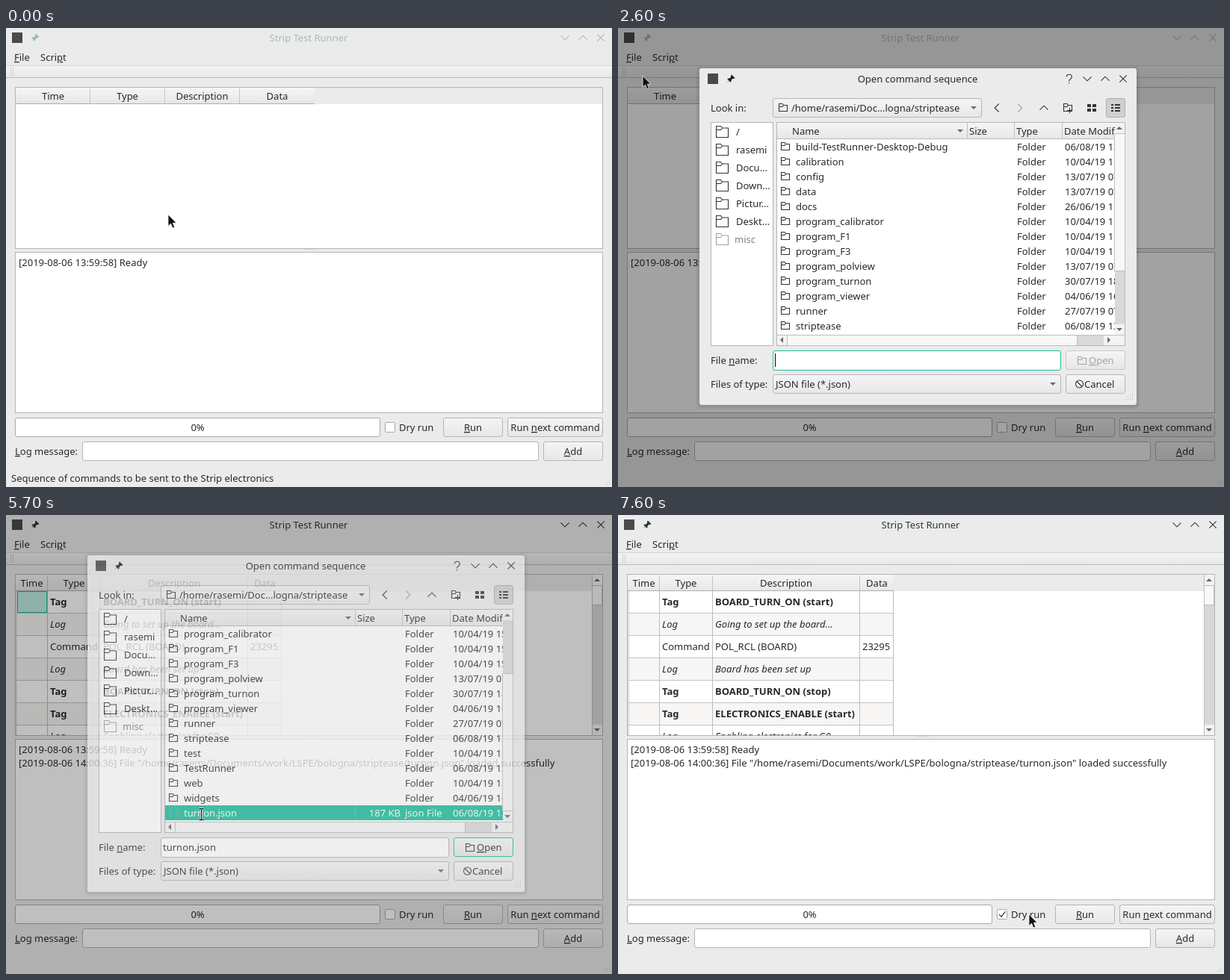
An HTML page that plays this animation: 811 px wide and 615 px high, repeating every 8 s.

```html
<!DOCTYPE html>
<html lang="en">
<head>
<meta charset="utf-8">
<title>Strip Test Runner</title>
<style>
html, body { margin: 0; width: 100%; height: 100%; overflow: hidden; background: #ebebeb; }
svg { display: block; width: 811px; height: 615px; }
text { font: 13px 'Noto Sans', 'Open Sans', sans-serif; fill: #26292c; }
.b { font-weight: 700; }
.i { font-style: italic; }
.u { text-decoration: underline; text-decoration-skip-ink: none; }
.w { fill: #fff; }
.off { fill: #a2a4a5; }
.ln { fill: none; stroke: #30353a; stroke-width: 1.1; }
</style>
</head>
<body>
<svg id="stage" viewBox="0 0 811 615"></svg>
<script>
const TEAL = '#1abc9c', EDGE = '#b4b5b6', INK = '#30353a', PALE = '#a6bac3', BG = '#ebebeb';
const LOOP = 8000, TICK = 100;

// ---- drawing helpers -------------------------------------------------
const box = (x, y, w, h, fill, stroke, r = 0) => stroke
  ? `<rect x="${x + .5}" y="${y + .5}" width="${w - 1}" height="${h - 1}" rx="${r}" fill="${fill}" stroke="${stroke}"/>`
  : `<rect x="${x}" y="${y}" width="${w}" height="${h}" rx="${r}" fill="${fill}"/>`;

const path = (d, stroke = INK, extra = '') => `<path class="ln" d="${d}" style="stroke:${stroke}" ${extra}/>`;

// "&" marks the underlined letter
const text = (x, y, s, cls = '', anchor = 'start') => {
  const body = s.replace(/&(.)/, '<tspan class="u">$1</tspan>');
  return `<text x="${x}" y="${y}" class="${cls}" text-anchor="${anchor}">${body}</text>`;
};
const mid = (x, y, s, cls = '') => text(x, y, s, cls, 'middle');

const group = (id, body, extra = '') => `<g id="${id}" ${extra}>${body}</g>`;
const at = (x, y, body) => `<g transform="translate(${x} ${y})">${body}</g>`;

const chevron = (x, y, dx, dy, color) => dy
  ? path(`M${x - 5.5} ${y - 2.7 * dy}L${x} ${y + 2.8 * dy}L${x + 5.5} ${y - 2.7 * dy}`, color)
  : path(`M${x - 2.7 * dx} ${y - 5.5}L${x + 2.8 * dx} ${y}L${x - 2.7 * dx} ${y + 5.5}`, color);
const cross = (x, y, color) =>
  path(`M${x - 4.7} ${y - 4.7}l9.4 9.4M${x + 4.7} ${y - 4.7}l-9.4 9.4`, color);
const tri = (x, y, dx, dy, s = 4) => dy
  ? `<path d="M${x - s} ${y - s / 2 * dy}h${2 * s}l${-s} ${s * dy}z" fill="#65696c"/>`
  : `<path d="M${x - s / 2 * dx} ${y - s}v${2 * s}l${s * dx} ${-s}z" fill="#65696c"/>`;
const pin = (x, y, color) => at(x, y,
  `<path d="M1-5.5L5.5-1L4 0L2.6-.2L.6 1.8L.4 4L-.8 4.4L-2.4 2.6L-5.4 5.4L-2.8 2.2L-4.6.6L-4-.4L-1.8-.6L.2-2.6L0-4.2z" fill="${color}"/>`);
const button = (x, y, w, h = 26, edge = EDGE) => box(x, y, w, h, 'url(#btn)', edge, 2.5);
const folder = (x, y, color = INK) =>
  path(`M${x + .5} ${y + 10.5}v-10h4.5l1.5 2h5v8zM${x + .5} ${y + 4.5}h4.5l1.5-2`, color);
const bigFolder = (x, y, color = INK) =>
  path(`M${x + .5} ${y + 15.5}v-15h6l2 2.5h8v12.5zM${x + .5} ${y + 5.5}h6l2-2.5`, color);
const mark = (x, y) => box(x, y, 14, 14, '#4a4a4a');

const dots = (x, y, cols, rows, sx, sy) => {
  let s = '';
  for (let c = 0; c < cols; c++) for (let r = 0; r < rows; r++) s += box(x + c * sx, y + r * sy, 1, 1, '#b2b2b2');
  return s;
};

// ---- main window -----------------------------------------------------
const titleBar = (id, color, pinColor) => group(id,
  mid(405, 18, 'Strip Test Runner').replace('class=""', `style="fill:${color}"`) +
  chevron(748, 13, 0, 1, color) + chevron(772, 13, 0, -1, color) + cross(796, 13, color) +
  pin(39, 13, pinColor));

const header = (edges, labels) => {
  const last = edges[edges.length - 1];
  let s = box(edges[0], 80, last - edges[0], 21, 'url(#btn)') + box(edges[0], 101, last - edges[0], 1, '#aeafb0');
  labels.forEach((l, i) => {
    s += mid((edges[i] + edges[i + 1]) / 2 + .5, 96, l);
    if (i) s += box(edges[i], 81, 1, 20, '#c3c4c4');
  });
  return s;
};
const COLS = ['Time', 'Type', 'Description', 'Data'];

const ROWS = [
  ['Tag', 'BOARD_TURN_ON (start)'], ['Log', 'Going to set up the board...'],
  ['Command', 'POL_RCL (BOARD)', '23295'], ['Log', 'Board has been set up'],
  ['Tag', 'BOARD_TURN_ON (stop)'], ['Tag', 'ELECTRONICS_ENABLE (start)'],
  ['Log', 'Enabling electronics for G0...']
];

function loadedTable() {
  let s = header([13, 55, 126, 323, 369], COLS);
  ROWS.forEach(([type, desc, data = ''], i) => {
    const y = 102 + i * 30, cls = { Tag: 'b', Log: 'i' }[type] || '';
    if (i % 2) s += box(14, y, 355, 29, '#f7f6f5');
    s += box(14, y + 29, 355, 1, '#c2c3c3');
    s += text(59, y + 19, type, cls) + text(130, y + 19, desc, cls) + text(327, y + 19, data);
  });
  [13.5, 55, 126, 323, 368].forEach(x => s += box(x, 102, 1, 194, '#bcbdbd'));
  s += group('cell', box(15, 102, 40, 29, 'rgba(26,188,156,.28)', TEAL));
  s += box(784, 80, 14, 215, '#d8d8d8') + box(784, 80, 14, 15, '#f2f2f2') + box(784, 281, 14, 14, '#f2f2f2');
  s += box(784, 80, 1, 215, '#c0c0c0') + box(784, 94, 14, 27, '#f8f8f8', '#bebebe');
  return s + tri(791, 87, 0, -1) + tri(791, 288, 0, 1);
}

function mainWindow() {
  let s = box(0, 0, 811, 615, BG) + mark(8, 6);
  s += titleBar('idle', PALE, '#9db6c2') + titleBar('active', INK, INK);
  s += group('fileOn', box(7, 28, 29, 23, TEAL, '#17a98c') + text(11, 44, '&File', 'w'));
  s += group('fileOff', text(11, 44, '&File')) + text(46, 44, 'Scri&pt');
  s += box(0, 50, 811, 17, 'url(#btn)') + box(0, 50, 811, 1, '#d5d5d5') + box(0, 66, 811, 1, '#bcbcbc');
  s += dots(6, 53, 2, 6, 3, 2);
  s += box(12, 79, 787, 217, '#fff', EDGE) + box(13, 80, 785, 22, BG);
  s += group('empty', header([13, 112, 212, 312, 413], COLS));
  s += group('loaded', loadedTable(), 'clip-path="url(#tableClip)"');
  s += dots(399, 296, 6, 1, 3, 2);
  s += box(12, 300, 787, 216, '#fff', EDGE) + text(17, 319, '[2019-08-06 13:59:58] Ready');
  s += group('log2', text(17, 337,
    '[2019-08-06 14:00:36] File "/home/rasemi/Documents/work/LSPE/bologna/striptease/turnon.json" loaded successfully'));
  s += box(12, 522, 489, 26, '#fff', '#a9aaab', 2.5) + mid(256.5, 540, '0%');
  s += box(507, 528, 14, 14, '#fff', '#a9aaab', 1);
  s += group('check', path('M510 535l3 3.4l5.2-7', '#1b1d1f', 'stroke-width="2"'));
  s += text(526, 540, 'Dry run');
  s += button(585, 522, 80) + mid(625, 540, '&Run') + button(671, 522, 128) + mid(735, 540, 'Run &next command');
  s += text(12, 572, '&Log message:') + box(102, 554, 611, 26, '#fff', EDGE, 2.5);
  s += button(719, 554, 80) + mid(759, 572, '&Add');
  s += group('status', text(7, 608, 'Sequence of commands to be sent to the Strip electronics'));
  return s + dots(801, 611, 3, 1, 3, 3) + dots(804, 608, 2, 1, 3, 3) + dots(807, 605, 1, 1, 3, 3);
}

// ---- File menu -------------------------------------------------------
function fileMenu() {
  const item = (y, label, key, cls = '') => text(35, y, label, cls) + text(141, y, key, cls);
  return box(7, 51, 188, 80, '#efefef', '#b8b9b9') + box(8, 103, 186, 1, '#c8c8c8') +
    group('loadOff', item(69, '&Load...', 'Ctrl+O')) +
    group('loadOn', box(8, 52, 186, 25, TEAL) + item(69, '&Load...', 'Ctrl+O', 'w')) +
    item(95, '&Save as...', 'Ctrl+S') + item(123, '&Quit', 'Ctrl+Q');
}

// ---- file dialog -----------------------------------------------------
const FILES = `build-TestRunner-Desktop-Debug 06/08/19 13|calibration 10/04/19 15|config 13/07/19 07
data 13/07/19 07|docs 26/06/19 15|program_calibrator 10/04/19 15|program_F1 10/04/19 15
program_F3 10/04/19 15|program_polview 13/07/19 07|program_turnon 30/07/19 18|program_viewer 04/06/19 16
runner 27/07/19 07|striptease 06/08/19 13|test 10/04/19 15|TestRunner 06/08/19 13
web 10/04/19 15|widgets 04/06/19 16`.split(/[|\n]/);

function fileRows() {
  let s = '';
  FILES.forEach((f, i) => {
    const [name, ...date] = f.split(' '), y = 164 + i * 20;
    s += folder(218, y - 11) + text(238, y, name) + text(534, y, 'Folder') + text(598, y, date.join(' '));
  });
  const y = 164 + FILES.length * 20;
  const last = cls => text(238, y, 'turnon.json', cls) + text(528, y, '187 KB', cls, 'end') +
    text(534, y, 'json File', cls) + text(598, y, '06/08/19 13', cls);
  s += group('rowOff', last(''));
  s += group('rowOn', box(213, y - 15, 452, 20, TEAL) + box(467, y - 15, 1, 20, '#3fc9ad') + last('w'));
  return s + path(`M222 ${y - 10}q-2 0-2 2.500t-1.500 2.500q1.500 0 1.500 2.500t2 2.500M227 ${y - 10}q2 0 2 2.500t1.500 2.500q-1.500 0-1.500 2.500t-2 2.500`, '#8e9a97');
}

function scrollBars() {
  let s = box(665, 127, 13, 284, '#d9d9d9') + box(665, 127, 13, 14, '#f3f3f3') + box(665, 397, 13, 14, '#f3f3f3');
  s += group('thumb', box(664, 141, 15, 185, '#f8f8f8', '#bfbfbf')) + tri(671, 134, 0, -1) + tri(671, 404, 0, 1);
  s += box(213, 411, 465, 1, '#c2c2c2') + box(213, 412, 465, 13, '#d9d9d9') + box(213, 412, 14, 13, '#f3f3f3');
  s += box(650, 412, 28, 13, '#f3f3f3') + box(226, 411, 389, 15, '#f8f8f8', '#bfbfbf');
  return s + tri(219, 418, -1, 0) + tri(657, 418, 1, 0);
}

function toolIcons() {
  let s = chevron(507, 107, -1, 0, INK) + chevron(538, 107, 1, 0, '#a0a2a4') + chevron(570, 107, 0, -1, INK);
  s += folder(596, 101) + path('M604.500 107v7M601 110.500h7');
  for (const x of [628, 635]) for (const y of [102, 108]) s += box(x, y, 5, 4, INK);
  s += box(653, 94, 26, 26, '#cfd0d0', '#adaeae', 2.5);
  for (const y of [102, 106, 110]) s += box(660, y, 3, 2, INK) + box(665, y, 7, 2, INK);
  return s;
}

function dialog() {
  let s = '';
  for (let k = 5; k; k--) s += box(109 - k, 55 - k, 585 + 2 * k, 451 + 2 * k, 'rgba(0,0,0,.025)', '', 3 + k);
  s += box(109, 54, 585, 451, BG, '', 3) + mark(120, 61) + pin(151, 68, '#1d1f21');
  s += mid(401, 73, 'Open command sequence');
  s += path('M600.300 65.500q0-3.200 3.500-3.200t3.500 3q0 1.800-2 3.200t-1.700 3M603.600 73v1.600');
  s += chevron(628, 68, 0, 1, INK) + chevron(652, 68, 0, -1, INK) + cross(676, 68, INK);
  s += text(124, 112, 'Look in:') + button(207, 94, 280) + folder(215, 101);
  s += text(232, 112, '/home/rasemi/Doc...logna/striptease') + tri(476, 107, 0, 1) + toolIcons();

  s += box(124, 126, 84, 300, '#fff', EDGE);
  ['/', 'rasemi', 'Docu...', 'Down...', 'Pictur...', 'Deskt...'].forEach((l, i) =>
    s += bigFolder(131, 131 + i * 24) + text(158, 144 + i * 24, l));
  s += bigFolder(131, 275, '#a0a2a4') + text(156, 288, 'misc').replace('class=""', 'style="fill:#808486"');

  s += box(212, 126, 467, 300, '#fff', EDGE);
  s += `<g clip-path="url(#listClip)">${group('rows', fileRows())}</g>`;
  s += box(213, 127, 452, 21, 'url(#btn)') + box(213, 148, 452, 1, '#b8b9b9');
  [467, 530, 594].forEach(x => s += box(x, 127, 1, 21, '#c0c1c1'));
  s += text(233, 143, 'Name') + tri(458, 138, 0, 1) + text(470, 143, 'Size') + text(533, 143, 'Type');
  s += `<g clip-path="url(#headClip)">${text(597, 143, 'Date Modified')}</g>` + scrollBars();

  s += text(124, 450, 'File &name:') + text(124, 482, 'Files of type:');
  s += group('nameOn', box(207, 432, 386, 27, '#fff', TEAL, 2.5));
  s += group('caret', box(210, 436, 1, 18, '#000'));
  s += group('nameOff', box(207, 432, 386, 27, '#fff', EDGE, 2.5) + text(210, 450, 'turnon.json'));
  s += group('openOff', button(599, 432, 80, 26, '#c9caca') + folder(615, 440, '#a2a4a5') + text(630, 450, '&Open', 'off'));
  s += group('openOn', button(599, 432, 80, 26, TEAL) + folder(615, 440) + text(630, 450, '&Open'));
  s += button(207, 464, 386) + text(211, 482, 'JSON file (*.json)') + tri(582, 477, 0, 1);
  s += button(599, 464, 80) + text(624, 482, 'Cancel');
  s += `<circle class="ln" cx="617.5" cy="477" r="5"/>` + path('M614 473.500l7 7');
  return s + dots(679, 497, 4, 1, 3, 3) + dots(682, 494, 3, 1, 3, 3) + dots(685, 491, 2, 1, 3, 3);
}

// ---- scene -----------------------------------------------------------
const clip = (id, x, y, w, h) => `<clipPath id="${id}"><rect x="${x}" y="${y}" width="${w}" height="${h}"/></clipPath>`;
document.getElementById('stage').innerHTML =
  `<defs><linearGradient id="btn" x2="0" y2="1"><stop stop-color="#f5f5f5"/><stop offset="1" stop-color="#e7e7e7"/></linearGradient>
  ${clip('tableClip', 13, 80, 785, 215)}${clip('listClip', 213, 149, 452, 262)}${clip('headClip', 595, 127, 70, 21)}</defs>` +
  mainWindow() + group('dim', box(0, 0, 811, 615, '#000')) +
  group('dialog', dialog()) + group('menu', fileMenu()) +
  group('arrow', '<path d="M0 0V15.400L3.500 12.200L6 18L8.700 16.900L6.300 11.200H11z" fill="#111" stroke="#fff" stroke-width=".9" stroke-opacity=".85"/>') +
  group('beam', '<path d="M-3-7.500H-.8L0-7L.8-7.500H3M0-7V7M-3 7.500H-.8L0 7L.8 7.500H3" fill="none" stroke="#fff" stroke-width="3"/>' +
    '<path d="M-3-7.500H-.8L0-7L.8-7.500H3M0-7V7M-3 7.500H-.8L0 7L.8 7.500H3" fill="none" stroke="#111" stroke-width="1.300"/>');

const el = {};
document.querySelectorAll('g[id]').forEach(g => el[g.id] = g);

// ---- timing ----------------------------------------------------------
// value tables: [start ms, value]
const DIM = [[0, 0], [2200, .04], [2300, .12], [2400, .28], [2600, .365], [2700, .375],
  [5700, .25], [5800, .12], [5900, .06], [6000, .02], [6100, 0]];
const DIALOG = [[0, 0], [2200, .2], [2300, .65], [2400, 1], [5700, .75], [5800, .32], [5900, .14], [6000, .05], [6100, 0]];
const MENU = [[0, 0], [1400, .3], [1500, .7], [1600, 1], [2200, .9], [2300, .68], [2400, 0]];
const CELL = [[0, 1], [7500, .4], [7600, 0]];
const SCROLL = [[0, 0], [3500, 3], [3600, 5]];
// pointer moves: [first tick, last tick, x, y, eased]
const MOVES = [[300, 900, 9, 35, 1], [1800, 1800, 30, 62, 0], [2000, 2000, 33, 64, 0], [3000, 3500, 350, 334, 1],
  [3800, 4600, 270, 389, 1], [4700, 5000, 261, 401, 0], [6500, 7100, 550, 535, 1]];

const pick = (table, t) => table.reduce((v, [start, val]) => t >= start ? val : v, 0);
const ease = p => p * p * (3 - 2 * p);

function pointer(t) {
  let x = 217, y = 250;
  for (const [a, b, tx, ty, soft] of MOVES) {
    if (t < a) break;
    const p = Math.min(1, (t - a + TICK) / (b - a + TICK)), k = soft ? ease(p) : p;
    x += (tx - x) * k;
    y += (ty - y) * k;
  }
  return [Math.round(x), Math.round(y)];
}

const fade = (id, v) => {
  el[id].style.opacity = v;
  el[id].style.display = v ? '' : 'none';
};
const swap = (on, off, state) => { fade(on, +state); fade(off, +!state); };

function render(ms) {
  const t = Math.floor(ms / TICK) * TICK;
  const [x, y] = pointer(t);
  const loaded = t >= 5700, chosen = t >= 5500;

  swap('active', 'idle', (t >= 1400 && t < 2400) || loaded);
  swap('fileOn', 'fileOff', t >= 1400 && t < 2200);
  swap('loadOn', 'loadOff', t >= 1800);
  swap('loaded', 'empty', loaded);
  fade('log2', +loaded);
  fade('status', +(t < 700));
  fade('check', +(t >= 7500));
  fade('cell', pick(CELL, t));
  fade('dim', pick(DIM, t));
  fade('dialog', pick(DIALOG, t));
  fade('menu', pick(MENU, t));

  swap('rowOn', 'rowOff', chosen);
  swap('nameOff', 'nameOn', chosen);
  swap('openOn', 'openOff', chosen);
  fade('caret', +(!chosen && (t < 3000 || Math.floor(t / 500) % 2 === 1)));
  const n = pick(SCROLL, t);
  el.rows.setAttribute('transform', `translate(0 ${-20 * n})`);
  el.thumb.setAttribute('transform', `translate(0 ${Math.round(14.2 * n)})`);

  const overLog = loaded && y > 300 && y < 516;
  swap('beam', 'arrow', overLog);
  el.arrow.setAttribute('transform', `translate(${x} ${y})`);
  el.beam.setAttribute('transform', `translate(${x + .5} ${y})`);
}

const start = performance.now();
function loop(now) {
  render(Math.max(0, now - start) % LOOP);
  requestAnimationFrame(loop);
}
render(0);
requestAnimationFrame(loop);
</script>
</body>
</html>
```
